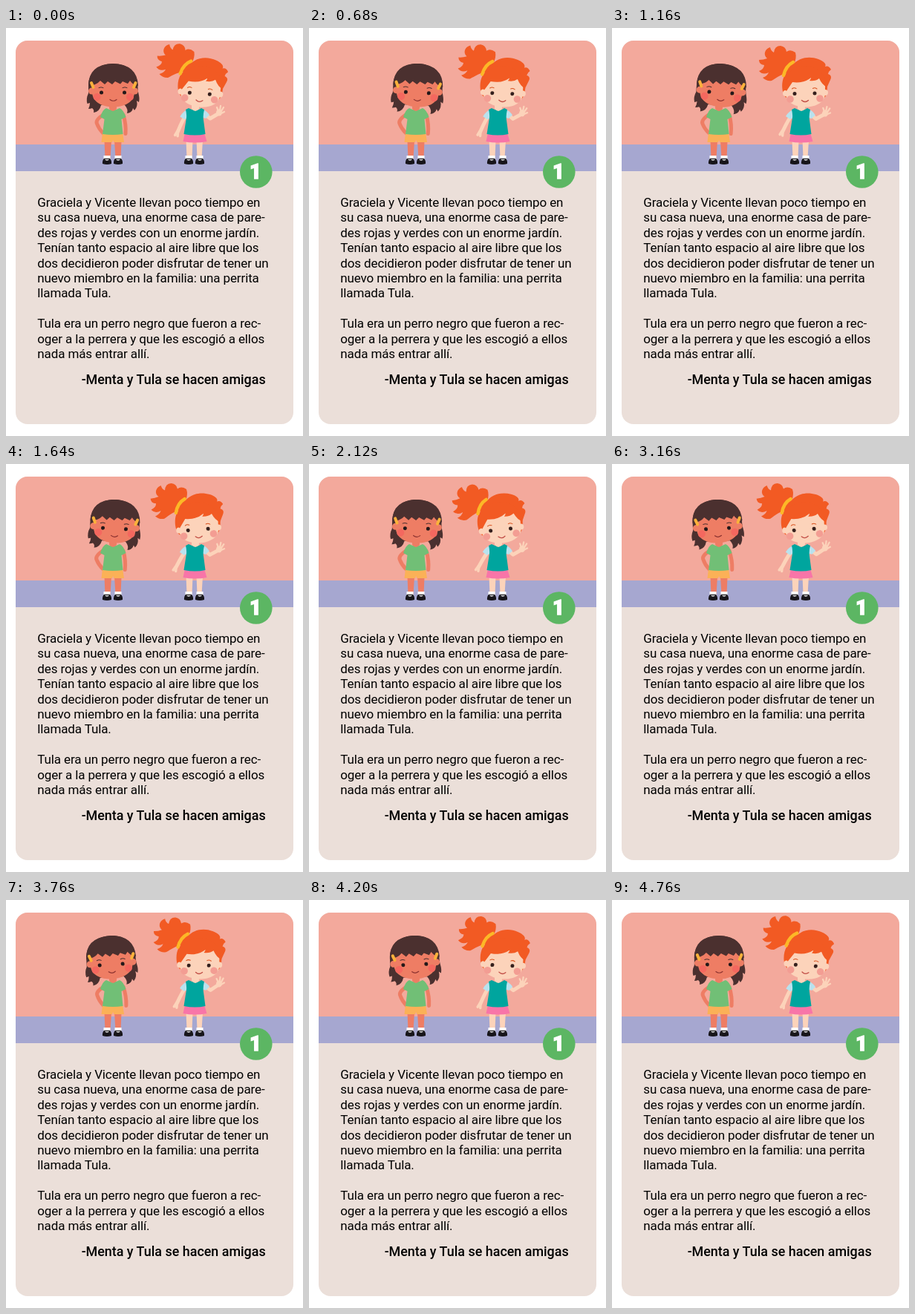
Animation of 400 by 550 pixels, one loop 4800 ms. Source, as an HTML page:

```html
<!DOCTYPE html>
<html lang="es">
<head>
<meta charset="utf-8">
<title>Cuento</title>
<style>
html, body { margin: 0; width: 100%; height: 100%; overflow: hidden; background: #fff; }
svg { display: block; width: 100vw; height: 100vh; }
text { font-family: Roboto, sans-serif; fill: #000; }
.line { fill: none; stroke-linecap: round; stroke-linejoin: round; }
.tan { fill: #ee7d64; }
.tan.line { fill: none; stroke: #ee7d64; }
.pale { fill: #fcd3ba; }
.pale.line { fill: none; stroke: #fcd3ba; }
.brown { fill: #4b302f; }
.red { fill: #f25a23; }
</style>
</head>
<body>
<svg viewBox="0 0 400 550">
  <defs>
    <clipPath id="card"><rect x="13" y="17" width="374" height="517" rx="16"/></clipPath>
    <g id="shoe">
      <path d="M-4.500 -8H4.500V1H-4.500Z" fill="#fff"/>
      <path d="M-6 3C-6.500 -1 -4.500 -4 -4 -4Q0 1.500 4 -4C5 -3 6.500 -1 6 3Q0 5 -6 3Z" fill="#17151a"/>
      <path d="M-4 -3.500H4" stroke="#17151a" stroke-width="1.300"/>
    </g>
  </defs>

  <g clip-path="url(#card)">
    <rect x="13" y="17" width="374" height="517" fill="#ebdfd9"/>
    <rect x="13" y="17" width="374" height="141" fill="#f3a99c"/>
    <rect x="13" y="157" width="374" height="36" fill="#a6a7d0"/>
  </g>

  <g id="brunette">
    <path class="tan" d="M132.500 152H142L140.500 176H133.500ZM146 152H155.500L154.500 176H147.500Z"/>
    <use href="#shoe" x="136" y="180"/>
    <use href="#shoe" x="151" y="180"/>
    <path id="armA" class="tan line" d="M131 117Q120 124 122.500 129Q125 136 131 142" stroke-width="5"/>
    <path id="armB" class="tan line" d="M158 117Q162 130 161 142.500" stroke-width="5"/>
    <path d="M130 141H157L159 154H145.500L144 151L143 154H128.500Z" fill="#fbb157"/>
    <path id="hairA" class="brown" d="M111 78C111 59 125 48 144 48C164 48 177 59 177.500 78C177 88 181 92 179 100L176 98Q178 106 173 111L171 108Q170 114 163 115Q165 110 160 104H128Q126 113 118 114Q119 110 116 108Q114 109 111 109Q113 105 113 101L109.500 102Q107.500 95 111 88Z"/>
    <path d="M135 108Q144 113 153 108Q158 110 161.500 120L155.500 123L157.500 143Q144 145 130 143L132.500 123L127 120Q130 110 135 108Z" fill="#71bf76"/>
    <path class="tan" d="M139 102H149V109Q144 115 139 109Z"/>
    <g id="headA">
      <circle class="tan" cx="115.500" cy="85" r="4.500"/>
      <circle class="tan" cx="173.500" cy="85" r="4.500"/>
      <path class="tan" d="M116 76Q118 62 144.500 62Q171 62 173 76V86C173 100 159 106.500 144.500 106.500S116 100 116 86Z"/>
      <path class="brown" d="M111 78Q111 49 144 48Q177 49 178 78Q171 77 167 71L164 75L157 72L154 75.500L147 72L143 76L137 72L133 76L127 71Q122 77 111 78Z"/>
      <path class="line" d="M115 74L117.500 80M174.500 74L172 80" stroke="#fcb13b" stroke-width="4"/>
      <circle cx="122.500" cy="93" r="5" fill="#f4685f"/>
      <circle cx="167" cy="93" r="5" fill="#f4685f"/>
      <circle cx="128.500" cy="87" r="2.500" fill="#231819"/>
      <circle cx="159.500" cy="87" r="2.500" fill="#231819"/>
      <path class="line" d="M125 80.500Q128 79 131 80.500M157 80.500Q160 79 163 80.500" stroke="#4b302f" stroke-width="1"/>
      <path class="line" d="M140 96.500Q144.500 100 149 96.500" stroke="#8b3230" stroke-width="1.200"/>
    </g>
  </g>

  <g id="redhead">
    <path class="pale" d="M242.500 151H251.500L250.500 176H243.500ZM256.500 151H265L263.500 176H257.500Z"/>
    <use href="#shoe" x="246" y="180"/>
    <use href="#shoe" x="261" y="180"/>
    <g id="armC">
      <path class="pale line" d="M244 115Q238 122 230 139" stroke-width="5"/>
      <path class="pale line" d="M229 139L226 143.500M230 140L229.500 145" stroke-width="3.500"/>
      <path d="M246 109Q238 112 234 119L240 123L246 120Z" fill="#b9e2ee"/>
    </g>
    <g id="armD">
      <path class="pale line" d="M266 115L275 122L285 116" stroke-width="5"/>
      <ellipse class="pale" cx="287" cy="114" rx="4" ry="4.500"/>
      <path class="pale line" d="M286 112L284 107M288 111L289 105M290 112L293 107M290 115L294 113" stroke-width="2.300"/>
      <path d="M263 109Q270 111 274 117L269 122L263 120Z" fill="#b9e2ee"/>
    </g>
    <path d="M241 141H267L270.500 153Q255 156 238.500 153Z" fill="#f875a8"/>
    <path d="M246 108Q256 114 263 108L267 110Q265 118 266 124L268.500 143Q255 146 239.500 143L242.500 124Q244 118 242 110Z" fill="#00a59e"/>
    <path class="pale" d="M250 102H260V109Q255 115 250 109Z"/>
    <g id="headB">
      <path class="red" d="M239 61C229 61 222 67 215 71Q208 72 203 67Q209 65 211 60Q203 64 198 58Q205 55 205 50Q198 49 198 43Q204 43 209 41C203 36 206 28 213 26Q214 31 218 33Q219 24 227 24Q234 25 235 32Q240 28 247 33Q249 40 245 49Z"/>
      <path class="red" d="M239 57C245 42 262 36 278 42C286 45 289 49 287 52Q292 50 295 56Q292 58 291 62Q297 64 294 70L290 79Q290 90 286 94L235 94C229 91 227 74 232 65Q235 60 239 57Z"/>
      <path class="line" d="M244 46Q234 51 231 64" stroke="#fcb827" stroke-width="4.500"/>
      <circle class="pale" cx="234" cy="88" r="4"/>
      <circle class="pale" cx="287" cy="87" r="4"/>
      <path class="pale" d="M234 79Q236 64 260 63Q285 64 287 78V88C287 100 275 106.500 260.500 106.500S234 100 234 88Z"/>
      <path class="red" d="M230 80Q231 55 258 51Q287 51 290 80Q283 77 279 68Q274 72 266 71Q268 69 268 67Q258 75 243 73Q239 79 235 85Z"/>
      <circle cx="240" cy="96" r="4.800" fill="#f39d93"/>
      <circle cx="280" cy="95" r="4.800" fill="#f39d93"/>
      <circle cx="246" cy="88.500" r="2.500" fill="#35201d"/>
      <circle cx="273" cy="88" r="2.500" fill="#35201d"/>
      <path class="line" d="M242.500 82Q245 80 248 81.500M270.500 81.500Q273 80 276 82" stroke="#d9531f" stroke-width="1"/>
      <path class="line" d="M255.500 97.500Q260 101.500 264.500 97.500" stroke="#c14d45" stroke-width="1.300"/>
    </g>
  </g>

  <circle cx="336.800" cy="194" r="21.800" fill="#5cb663"/>
  <text x="336" y="203.300" text-anchor="middle" font-size="27.500" font-weight="900" style="fill:#fff;stroke:#fff;stroke-width:1.300">1</text>
  <g id="story" font-size="17" letter-spacing="-.12"></g>
  <text x="349.700" y="480" text-anchor="end" font-size="17.900" font-weight="500">-Menta y Tula se hacen amigas</text>
</svg>
<script>
const LOOP = 4800, STEP = 40;
const $ = id => document.getElementById(id);

const lines = [
  "Graciela y Vicente llevan poco tiempo en",
  "su casa nueva, una enorme casa de pare-",
  "des rojas y verdes con un enorme jardín.",
  "Tenían tanto espacio al aire libre que los",
  "dos decidieron poder disfrutar de tener un",
  "nuevo miembro en la familia: una perrita",
  "llamada Tula.",
  "",
  "Tula era un perro negro que fueron a rec-",
  "oger a la perrera y que les escogió a ellos",
  "nada más entrar allí."
];
lines.forEach((line, i) => {
  const el = document.createElementNS("http://www.w3.org/2000/svg", "text");
  el.setAttribute("x", 42.3);
  el.setAttribute("y", 241 + i * 20.4);
  el.textContent = line;
  $("story").append(el);
});

function turn(id, angle, x, y) {
  $(id).setAttribute("transform", `rotate(${angle.toFixed(3)} ${x} ${y})`);
}

// The two girls sway a quarter of a loop apart.
function draw(ms) {
  const a = 2 * Math.PI * (ms % LOOP) / LOOP;
  const s = Math.sin(a), c = Math.cos(a);

  turn("hairA", 3.6 * s, 144, 125);
  turn("headA", 3.6 * s, 144, 125);
  turn("armA", -2 * s, 131, 142);
  turn("armB", 2 * s, 158, 117);

  turn("headB", 5.5 * c - 0.3, 261, 103);
  turn("armC", -3 * c, 245, 113);
  turn("armD", 3 * s, 266, 114);
}

function tick() {
  draw(Math.floor(performance.now() / STEP) * STEP);
  requestAnimationFrame(tick);
}
tick();
</script>
</body>
</html>
```
